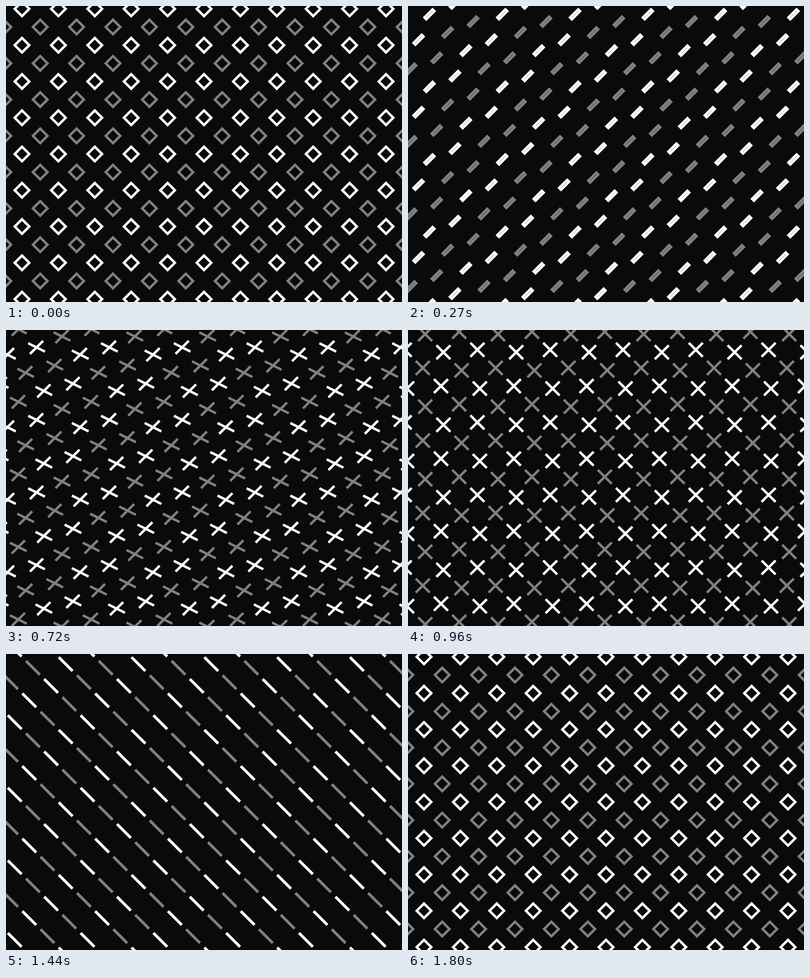
An HTML page with a canvas for the animation above (1830 ms loop, 800 by 600 pixels).

```html
<!DOCTYPE html>
<html>
<head>
<meta charset="utf-8">
<style>
html, body { margin: 0; width: 100%; height: 100%; overflow: hidden; background: #0a0a0a; }
canvas { display: block; }
</style>
</head>
<body>
<canvas id="stage" width="800" height="600"></canvas>
<script>
const ctx = document.getElementById('stage').getContext('2d');
const STEP = 30, FRAMES = 61;
const GAP = 52, RANGE = 13, LINE = 5;
const SIDE = 20.8, FOLDED = 24, ARM = 35;

const ease = (p, power) => p < 0.5
  ? (2 * p) ** power / 2
  : 1 - (2 - 2 * p) ** power / 2;
const mix = (a, b, k) => a + (b - a) * k;

function box(w, h) {
  w = Math.max(w, 0.01);
  h = Math.max(h, 0.01);
  ctx.strokeRect(-w / 2, -h / 2, w, h);
}

function bar(length, angle) {
  const x = Math.cos(angle) * length / 2, y = Math.sin(angle) * length / 2;
  ctx.beginPath();
  ctx.moveTo(-x, -y);
  ctx.lineTo(x, y);
  ctx.stroke();
}

// Square folds to a bar, opens to a cross, closes again, then unfolds.
function shape(stage, p) {
  const fold = ease(p, 3), swing = ease(p, 4);
  const up = -Math.PI / 2, turn = up * (1 - swing);
  if (stage === 0) {
    box(mix(SIDE, 0, fold), mix(SIDE, FOLDED, fold));
  } else if (stage === 1) {
    const length = mix(FOLDED, ARM, swing);
    bar(length, up);
    bar(length, turn);
  } else if (stage === 2) {
    bar(ARM, 0);
    bar(ARM, turn);
  } else {
    box(mix(ARM, SIDE, fold), mix(0, SIDE, fold));
  }
}

function draw(now) {
  const frame = Math.floor(now / STEP) % FRAMES;
  const p = frame / (FRAMES - 1);
  const stage = Math.min(3, Math.floor(p * 4));

  ctx.setTransform(1, 0, 0, 1, 0, 0);
  ctx.fillStyle = '#0a0a0a';
  ctx.fillRect(0, 0, 800, 600);
  ctx.lineWidth = LINE;
  ctx.lineCap = 'square';
  ctx.translate(400, 300);
  ctx.rotate(Math.PI / 4);

  // Neighbouring rows slide in opposite directions.
  for (let j = -RANGE; j <= RANGE; j++) {
    const slide = (j % 2 ? 1 : -1) * 2 * GAP * p;
    for (let i = -RANGE; i <= RANGE; i++) {
      ctx.save();
      ctx.translate(i * GAP + slide, j * GAP);
      ctx.strokeStyle = (i + j) % 2 ? '#808080' : '#fff';
      shape(stage, p * 4 - stage);
      ctx.restore();
    }
  }
}

const start = performance.now();
function loop() {
  draw(performance.now() - start);
  requestAnimationFrame(loop);
}
loop();
</script>
</body>
</html>
```
